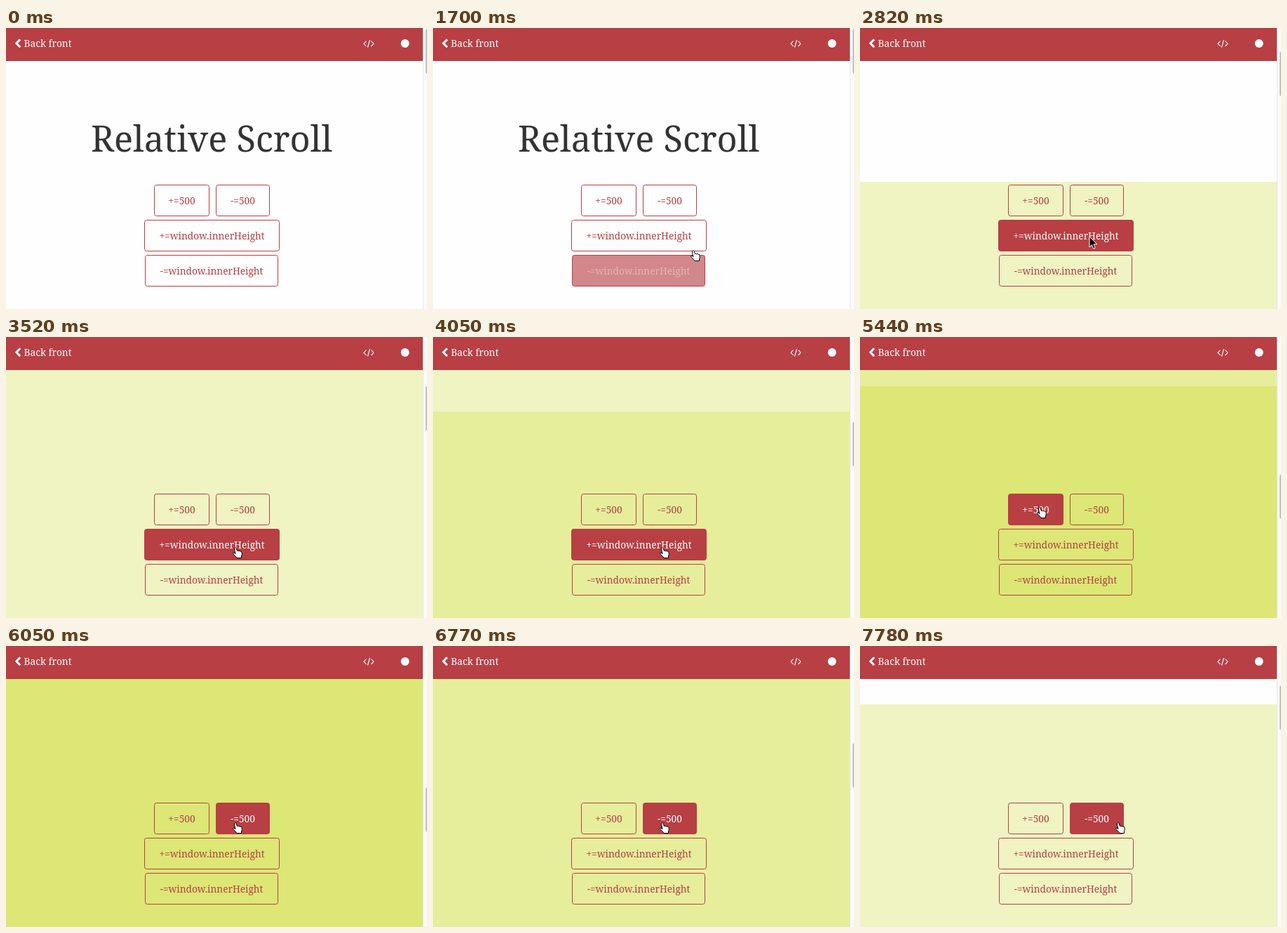
An HTML page that plays this animation: 600 px wide and 400 px high, repeating every 8 s.

```html
<!DOCTYPE html>
<html lang="en">
<head>
<meta charset="utf-8">
<title>Relative Scroll</title>
<style>
  html, body { margin: 0; width: 100%; height: 100%; overflow: hidden; background: #fefefe; }
  svg { display: block; width: 600px; height: 400px; }
  text { font: 13.7px "Noto Serif", "DejaVu Serif", serif; }
  .mid { text-anchor: middle; }
  .title { font-size: 50.5px; fill: #333; }
</style>
</head>
<body>
<svg viewBox="0 0 600 400">
  <rect width="600" height="400" fill="#fefefe"/>
  <g id="page">
    <rect y="414" width="594" height="414" fill="#f0f4c3"/>
    <rect y="828" width="594" height="414" fill="#e6ee9c"/>
    <rect y="1242" width="594" height="414" fill="#dce775"/>
    <text class="mid title" x="293" y="176">Relative Scroll</text>
  </g>
  <g id="buttons"></g>
  <rect width="594" height="47" fill="#b83f44"/>
  <path d="M20.2 16.3L14.8 21.8L20.2 27.3" fill="none" stroke="#fff" stroke-width="3"/>
  <text x="25.5" y="27" fill="#fff">Back front</text>
  <path d="M513.5 18.5L510 22.3L513.5 26M520.5 18.5L524 22.3L520.5 26M518.5 17L515.5 27.5" fill="none" stroke="#fff" stroke-width="1.1"/>
  <circle cx="568.7" cy="22" r="6" fill="#fff"/>
  <rect x="594" width="6" height="400" fill="#fafafa"/>
  <rect x="594" width="1" height="400" fill="#e8e8e8"/>
  <rect id="thumb" x="598" width="8" height="64" rx="3" fill="#c1c1c1"/>
  <g id="cursor">
    <path id="arrow" d="M0 0V15L3.5 11.8L5.8 17.2L8.3 16.1L6 10.8H10.8Z" fill="#000" stroke="#fff"/>
    <path id="hand" transform="translate(-4 2)" d="M4 9.5L2.4 3Q2.2 1 3.6.8Q4.9.6 5.4 2.2L6.4 5.6Q8 4.4 8.8 5.8Q10.2 4.8 11 6.2Q12.6 5.6 13 7.4Q13.8 10.5 12.5 13V15.5H6Q5 13.5 2.5 11.5Q0 9.3.8 8.2Q2 7.4 4 9.5Z" fill="#fff" stroke="#000"/>
  </g>
</svg>
<script>
const LOOP = 8000, VIEW = 414, STEP = 387, SCROLL_MS = 700, FADE_MS = 200;
const $ = id => document.getElementById(id);
const clamp = v => Math.max(0, Math.min(1, v));
const lerp = (a, b, k) => a + (b - a) * k;
const outQuart = p => 1 - (1 - clamp(p)) ** 4;
const smooth = p => p * p * (3 - 2 * p);

// click time, distance; a new click replaces the running scroll
const scrolls = [[2718, VIEW], [3849, VIEW], [5145, STEP], [6048, -STEP], [6930, -STEP], [6986, -STEP]];

// cursor moves: start, end, x, y
const moves = [
  [830, 830, 329, 391], [890, 890, 334, 384], [1080, 1290, 411, 349],
  [1430, 1870, 351, 297], [2250, 2520, 327, 297], [4590, 4840, 256, 240],
  [5640, 5900, 327, 249], [7440, 7655, 371, 251], [7780, 7780, 368, 249]
];

// label, x, y, width, hover intervals
const buttons = [
  ["+=500", 211, 223, 79, [[4710, 5710]]],
  ["-=500", 299, 223, 77, [[5740, 9000]]],
  ["+=window.innerHeight", 197, 273, 193, [[1700, 4685]]],
  ["-=window.innerHeight", 198, 323, 190, [[1560, 1690]]]
].map(([label, x, y, w, hovers]) => {
  $("buttons").insertAdjacentHTML("beforeend",
    `<g><rect x="${x + .5}" y="${y + .5}" width="${w - 1}" height="44" rx="3" fill="#b83f44" stroke="#b83f44"/>
     <text class="mid" x="${x + w / 2}" y="${y + 28}">${label}</text></g>`);
  const [rect, text] = $("buttons").lastElementChild.children;
  return { rect, text, hovers };
});

function scrollAt(t) {
  return scrolls.reduce((pos, [start, dist], i) => {
    const end = Math.min(t, scrolls[i + 1]?.[0] ?? LOOP);
    return pos + dist * outQuart((end - start) / SCROLL_MS);
  }, 0);
}

function cursorAt(t) {
  let x = 329, y = 391;
  for (const [start, end, toX, toY] of moves) {
    if (t < start) break;
    const k = end > start ? smooth(clamp((t - start) / (end - start))) : 1;
    x = lerp(x, toX, k);
    y = lerp(y, toY, k);
  }
  return [x, y];
}

function draw(t) {
  const pos = scrollAt(t);
  $("page").setAttribute("transform", `translate(0 ${-Math.round(pos)})`);
  $("thumb").setAttribute("y", 1 + pos / 6.04);

  for (const { rect, text, hovers } of buttons) {
    const level = Math.max(...hovers.map(([on, off]) =>
      clamp((Math.min(t, off) - on) / FADE_MS) * (1 - clamp((t - off) / FADE_MS))));
    rect.setAttribute("fill-opacity", level);
    text.setAttribute("fill", `rgb(${[184, 63, 68].map(c => Math.round(lerp(c, 255, level)))})`);
  }

  const [x, y] = cursorAt(t);
  const isArrow = t < 1560 || (t >= 2700 && t < 3520);
  $("cursor").setAttribute("transform", `translate(${Math.round(x)} ${Math.round(y)})`);
  $("cursor").style.display = t < 830 ? "none" : "";
  $("arrow").style.display = isArrow ? "" : "none";
  $("hand").style.display = isArrow ? "none" : "";
}

const began = performance.now();
function tick() {
  draw((performance.now() - began) % LOOP);
  requestAnimationFrame(tick);
}
tick();
</script>
</body>
</html>
```
